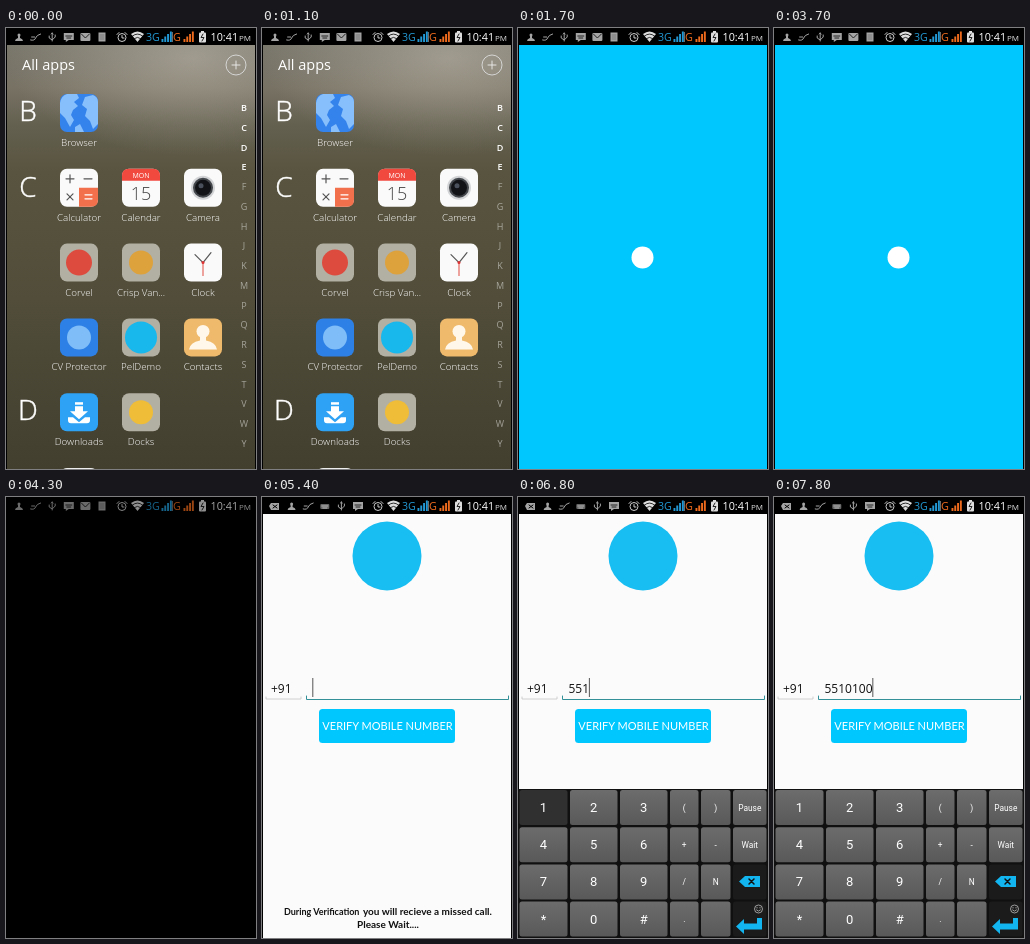
Animation of 250x441 px, one loop 8 s. Source, as an HTML page:

```html
<!DOCTYPE html>
<html lang="en">
<head>
<meta charset="utf-8">
<title>Phone verification</title>
<style>
html, body { margin: 0; width: 100%; height: 100%; overflow: hidden; background: #000 }
svg { display: block; width: 250px; height: 441px; font-family: "Open Sans", "Noto Sans", sans-serif }
.mid { text-anchor: middle }
.lato { font-family: Lato, sans-serif }
.keys { font-family: Roboto, sans-serif; fill: #fff; text-anchor: middle }
.line { fill: none; stroke-linecap: round; stroke-linejoin: round }
</style>
</head>
<body>
<svg id="stage" viewBox="0 0 250 441" xmlns="http://www.w3.org/2000/svg"></svg>
<script>
const LOOP = 8000, CYAN = '#00c8ff', TAN = '#b2afa3';
const presses = [[6200, '5'], [6600, '5'], [6800, '1'], [6900, '0'], [7300, '1'], [7500, '0'], [7700, '0']];

const rect = (x, y, w, h, fill, r = 0, more = '') => `<rect x="${x}" y="${y}" width="${w}" height="${h}" rx="${r}" fill="${fill}" ${more}/>`;
const circle = (x, y, r, fill, more = '') => `<circle cx="${x}" cy="${y}" r="${r}" fill="${fill}" ${more}/>`;
const path = (d, fill) => `<path d="${d}" fill="${fill}"/>`;
const line = (d, color, w = 1) => `<path class="line" d="${d}" stroke="${color}" stroke-width="${w}"/>`;
const text = (x, y, size, s, fill = '#fff', more = '') => `<text x="${x}" y="${y}" font-size="${size}" fill="${fill}" ${more}>${s}</text>`;
const mid = (x, y, size, s, fill, more = '') => text(x, y, size, s, fill, 'class="mid" ' + more);
const at = (x, y, s) => `<g transform="translate(${x} ${y})">${s}</g>`;
const tile = fill => rect(0, 0, 38, 38, fill, 7);

// Status bar
const GREY = '#a4a4a4';
const glyph = {
  box: path('M-4-3H4V4H-4L-6 0Z', GREY) + line('M-2-1L2 2M2-1L-2 2', '#000'),
  person: circle(0, -2, 1.5, GREY) + path('M-4 4Q-4 2-1 1L-1-1H1L1 1Q4 2 4 4Z', GREY),
  trail: line('M-5 3Q-1 4 0 1T5-3M-4 0H-1', GREY),
  usb: line('M0 4V-4M-3-1V1L0 3L3 0V-2M-1-3L0-4L1-3', GREY),
  sms: path('M-5-4H5V3H0L-3 5V3H-5Z', GREY) + line('M-3-1H3M-2 1H2', '#222'),
  mail: rect(-5, -4, 10, 8, GREY, 1) + line('M-4-3L0 1L4-3', '#222'),
  page: rect(-3.5, -4.5, 7, 9, GREY) + line('M-2-2H2M-2 0H2M-2 2H2', '#666', .7),
  keys: rect(-4.5, -2, 9, 5, '#666', 1) + line('M-3 0H3M-2 2H2', '#ccc', .8)
};
const iconRow = names => names.map((n, i) => at(13 + i * 16.6, 9, glyph[n])).join('');
const bars = (x, color) => [0, 1, 2, 3].map(i => rect(x + i * 2.8, 11 - i * 2.5, 1.9, 3 + i * 2.5, color)).join('');
const statusBar = rect(0, 0, 250, 17, '#000') + '<g id="status">' +
  `<g id="before">${iconRow(['person', 'trail', 'usb', 'sms', 'mail', 'page'])}</g>` +
  `<g id="after">${iconRow(['box', 'person', 'trail', 'keys', 'usb', 'sms'])}</g>` +
  circle(116, 9.5, 4, 'none', 'stroke="#ccc"') + line('M116 7.5V10H118M111 6.5L113 4.5M121 6.5L119 4.5', '#ccc') +
  path('M125 6Q131.5 1 138 6L131.5 14Z', '#ddd') + line('M126.5 8Q131.5 4 136.5 8M128.5 10.5Q131.5 8 134.5 10.5', '#000', .8) +
  text(140, 12.5, 10.6, '3G', '#2299d4') + bars(155.5, '#2299d4') +
  rect(166, 4, .7, 10, '#999') + text(167, 12.5, 10.8, 'G', '#ee6b1d') + bars(177.5, '#ee6b1d') +
  rect(193, 4.5, 7, 10, '#ddd', 1) + rect(195, 3, 3, 2, '#ddd') + line('M197 6L195 9.5H198L196 13', '#222') +
  text(204.5, 13, 10.8, '10:41') + text(233, 13, 8, 'PM', '#ddd') + '</g>';

// Launcher
const apps = [
  ['Browser', 0, 0, tile('#3482ec') + path('M0 9Q1 2 7 0H17L19 4L14 8L18 12L13 16L11 21L14 26L10 33L5 24L0 19ZM25 3L33 1Q38 3 38 8V30L33 35L30 27L25 22L27 15L22 11ZM15 33L20 30L24 38H15Z', '#86bffb')],
  ['Calculator', 0, 1, tile('#fafafa') + path('M19 19H38V31Q38 38 31 38H19Z', '#f2704c') +
    line('M10 6V14M6 10H14M24 10H32M7 25L13 31M13 25L7 31', '#555', 1.2) + line('M25 26H32M25 30H32', '#fff', 1.3)],
  ['Calendar', 1, 1, tile('#fafafa') + path('M0 12V7Q0 0 7 0H31Q38 0 38 7V12Z', '#f2493f') +
    mid(19, 9, 7, 'MON') + mid(19, 31.5, 18, '15', '#444', 'font-weight="300"')],
  ['Camera', 2, 1, tile('#fafafa') + circle(19, 19, 12, '#d2d4d6') + circle(19, 19, 10, '#44474b') +
    circle(19, 19, 8, '#111317') + circle(17, 17, 2.5, '#4a515c')],
  ['Corvel', 0, 2, tile(TAN) + circle(19, 19, 13, '#dd4b3e')],
  ['Crisp Van...', 1, 2, tile(TAN) + circle(19, 19, 12, '#dda23c')],
  ['Clock', 2, 2, tile('#fafafa') + line('M11 11L19 19L27 9', '#555', 1.2) + line('M19 19V32', '#e04a40') + circle(19, 19, 1.5, '#d33')],
  ['CV Protector', 0, 3, tile('#2d80e6') + circle(19, 19, 12, '#7fbdf8')],
  ['PelDemo', 1, 3, tile(TAN) + circle(19, 19, 16, '#18b7ec')],
  ['Contacts', 2, 3, tile('#f0ba6c') + circle(19, 13, 6.5, '#fff8ea') + path('M16 16H22V22Q32 24 33 31H5Q6 24 16 22Z', '#fff8ea')],
  ['Downloads', 0, 4, tile('#2ea2f4') + rect(15, 9, 8, 2.5, '#fff') + path('M15 13H23V18H28L19 26L10 18H15Z', '#fff') +
    path('M8 24H13L19 29L25 24H30V27Q30 30 27 30H11Q8 30 8 27Z', '#fff')],
  ['Docks', 1, 4, tile(TAN) + circle(19, 19, 12, '#efbd37')],
  ['', 0, 5, tile('#eee')]
];
const launcher = rect(1, 17, 248, 424, 'url(#wall)') + rect(1, 17, 248, 130, 'url(#glow)') +
  text(16, 42, 14.5, 'All apps') +
  circle(230, 37, 10, 'none', 'stroke="#ddd" stroke-width=".9"') + line('M226 37H234M230 33V41', '#eee', .9) +
  [['B', 93], ['C', 169], ['D', 392]].map(([s, y]) =>
    mid(22, y, 28, s, '#fff', 'font-weight="300" stroke="#fff" stroke-width=".5"')).join('') +
  [...'BCDEFGHJKMPQRSTVWY'].map((s, i) => mid(238, 83 + i * 19.75, 9, s, '#fff',
    i < 4 ? 'font-weight="600"' : 'opacity=".5"')).join('') +
  apps.map(([name, col, row, art]) => at(54 + col * 62, 66 + row * 74.8,
    art + mid(19, 52, 9.75, name, '#fff', 'font-weight="300"'))).join('');

// Number form
const form = rect(1, 17, 248, 424, '#fbfbfb') + circle(125, 59, 34.5, '#18bdf2') +
  text(9, 196, 12, '+91', '#111') + line('M4 200V202H39V200', '#c4c4c4', .8) +
  line('M44.5 199V202.5H246.5V199', '#338f98') +
  text(50.5, 196, 12, '', '#111', 'id="number"') + rect(0, 181, 1, 19, '#555', 0, 'id="caret"') +
  rect(57, 212, 136, 34, CYAN, 3.5) +
  `<g class="lato">${mid(125.5, 233, 11, 'VERIFY MOBILE NUMBER', '#fff')}<g font-weight="700">` +
  text(22, 418, 9, 'During Verification', '#111') + text(101, 418, 10, 'you will recieve a missed call.', '#111') +
  mid(126, 431, 10, 'Please Wait....', '#111') + '</g></g>';

// Keypad
const cols = [[1.5, 48], [52, 47.5], [102, 47.5], [152, 28.5], [183, 29.5], [215, 33.5]];
const rows = [['1', '2', '3', '(', ')', 'Pause'], ['4', '5', '6', '+', '-', 'Wait'], ['7', '8', '9', '/', 'N', ''], ['*', '0', '#', '.', '', '']];
const keypad = rect(0, 292, 250, 149, '#101010') + rows.map((row, r) => row.map((label, c) => {
  const [x, w] = cols[c], y = 293 + r * 37.2;
  const dark = c == 5 && r > 1;
  return rect(x, y, w, 35, dark ? '#1b1b1b' : 'url(#key)', 2.5, `data-key="${label}"`) +
    `<text x="${x + w / 2}" y="${y + (c < 3 ? 22 : 20.5)}" font-size="${c < 3 ? 13 : 8.4}">${label}</text>`;
}).join('')).join('') +
  path('M221 384.5L227 379H242V390H227Z', '#12b5f0') + line('M231 382L236 387M236 382L231 387', '#111', 1.5) +
  path('M218 429.5L226 422V426.5H239V421H244V432.5H226V437Z', '#12b5f0') +
  circle(240.5, 412, 4, 'none', 'stroke="#bbb" stroke-width=".8"') +
  line('M238.5 413Q240.5 415.5 242.5 413M239 410.5V411M242 410.5V411', '#bbb', .8);

const stops = list => list.map(([o, c, a = 1]) => `<stop offset="${o}" stop-color="${c}" stop-opacity="${a}"/>`).join('');
const gradient = (id, ...list) => `<linearGradient id="${id}" x2="0" y2="1">${stops(list)}</linearGradient>`;

document.getElementById('stage').innerHTML = '<defs>' +
  gradient('wall', [0, '#79766b'], [.1, '#777264'], [.19, '#646050'], [.3, '#58543f'], [.6, '#514d3a'], [1, '#423f2f']) +
  gradient('key', [0, '#6c6c6c'], [1, '#595959']) +
  `<radialGradient id="glow" cx=".75" cy=".1" r=".75">${stops([[0, '#d0cabc', .45], [1, '#d0cabc', 0]])}</radialGradient></defs>` +
  rect(0, 0, 250, 441, '#000') + `<g id="launcher">${launcher}</g>` +
  `<g id="splash">${rect(1, 17, 248, 424, CYAN)}${circle(124.5, 229.5, 11, '#fff')}</g>` +
  `<g id="form">${form}</g><g id="keypad" class="keys">${keypad}</g>` + statusBar;

const $ = id => document.getElementById(id);
const show = (id, on) => $(id).style.display = on ? '' : 'none';
const ramp = (t, a, b) => Math.min(1, Math.max(0, (t - a) / (b - a)));
const easeOut = p => 1 - (1 - p) ** 2;
const numberKeys = [...document.querySelectorAll('[data-key]')].filter(k => /^\d$/.test(k.dataset.key));

function draw(t) {
  show('launcher', t < 1500);
  show('splash', t >= 1200 && t < 4300);
  show('form', t >= 4500);
  show('before', t < 5300);
  show('after', t >= 5300);
  show('keypad', t >= 5500);

  const open = easeOut(ramp(t, 1100, 1500)), close = ramp(t, 3800, 4300);
  const scale = .8 + .2 * open;
  $('splash').setAttribute('opacity', open * (1 - close));
  $('splash').setAttribute('transform', `translate(125 229) scale(${scale}) translate(-125 -229)`);
  $('status').setAttribute('opacity', t < 4500 ? 1 - .35 * close : 1);
  $('keypad').setAttribute('transform', `translate(0 ${149 * (1 - easeOut(ramp(t, 5400, 5900)))})`);

  const typed = presses.filter(p => p[0] <= t);
  const [last, digit] = typed[typed.length - 1] || [5300, ''];
  $('number').textContent = typed.map(p => p[1]).join('');
  $('caret').setAttribute('x', 50.3 + typed.length * 6.86);
  show('caret', t >= last && (t - last) % 1000 < 500);
  for (const key of numberKeys)
    key.setAttribute('fill', key.dataset.key === digit && t - last < 100 ? '#303030' : 'url(#key)');
}

const start = performance.now();
function tick() {
  const t = (performance.now() - start) % LOOP;
  draw(Math.floor(t / 100) * 100);
  requestAnimationFrame(tick);
}
tick();
</script>
</body>
</html>
```
